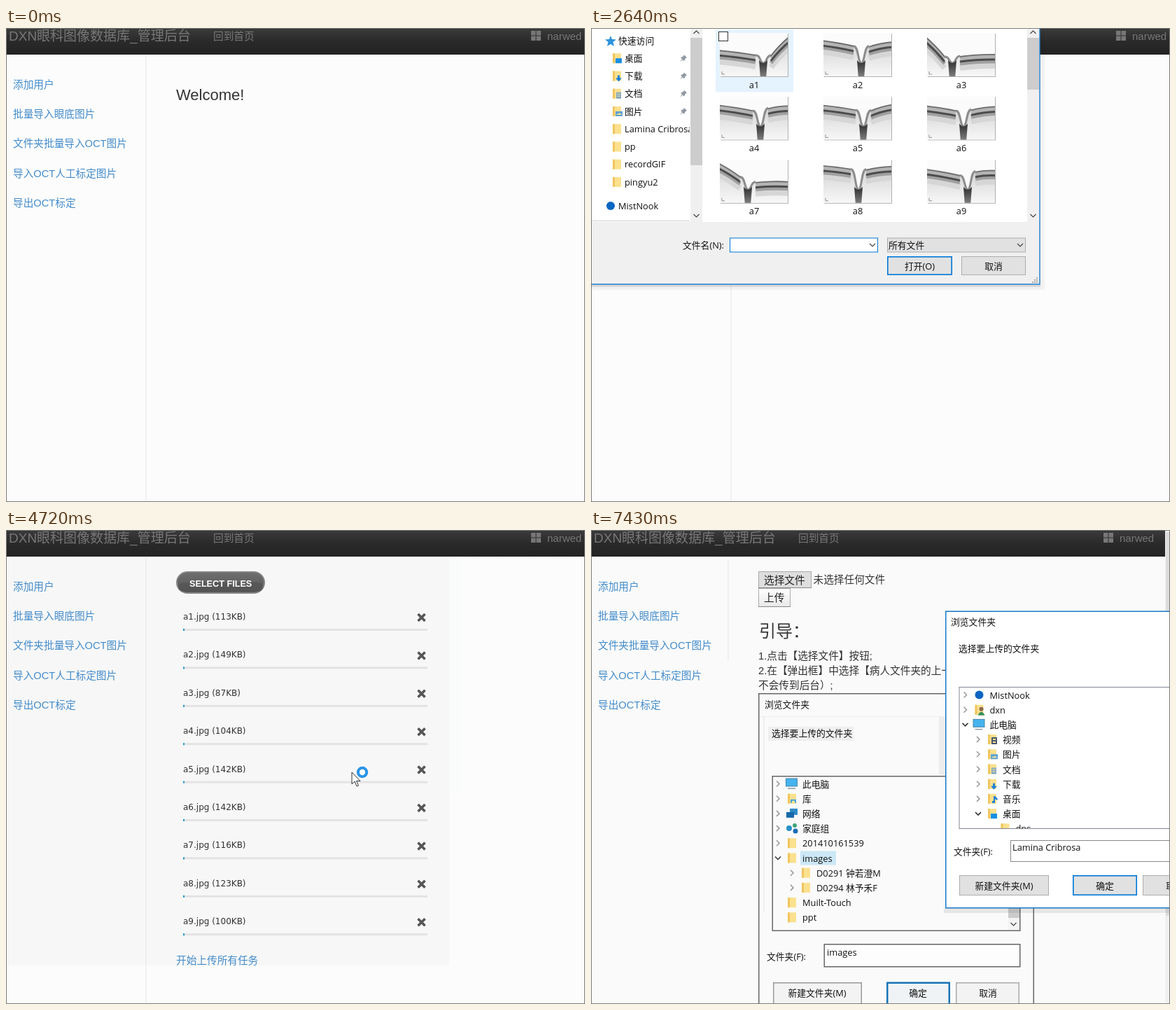
Write an HTML page that moves like this. It is 827 by 677 pixels and loops after 8000 ms.

```html
<!DOCTYPE html>
<html lang="zh-CN">
<head>
<meta charset="utf-8">
<style>
html, body { margin: 0; width: 100%; height: 100%; overflow: hidden; background: #fcfcfc; }
svg { display: block; }
text { font-family: "Liberation Sans", "Noto Sans CJK SC", "Noto Sans CJK", sans-serif; font-weight: 300; white-space: pre; text-spacing-trim: space-all; }
.ui { font-family: "Open Sans", "Noto Sans CJK SC", "Noto Sans CJK", sans-serif; font-weight: 400; }
.list { font-family: "DejaVu Sans", sans-serif; font-weight: 400; }
.bold { font-weight: 700; }
.soft { filter: blur(.7px); }
</style>
</head>
<body>
<svg id="stage" width="827" height="677" viewBox="0 0 827 677"></svg>
<script>
const LOOP = 8000;
const layers = [];
const at = (from, to, content) => layers.push({ from, to, content });

// Drawing helpers
const rect = (x, y, w, h, fill, more = "") => `<rect x="${x}" y="${y}" width="${w}" height="${h}" fill="${fill}" ${more}/>`;
const box = (x, y, w, h, fill, stroke, sw = 1) =>
  rect(x + sw / 2, y + sw / 2, w - sw, h - sw, fill, `stroke="${stroke}" stroke-width="${sw}"`);
const fillPath = (d, fill, more = "") => `<path d="${d}" fill="${fill}" ${more}/>`;
const line = (d, stroke, sw = 1, more = "") => `<path d="${d}" fill="none" stroke="${stroke}" stroke-width="${sw}" ${more}/>`;
const circle = (x, y, r, fill, more = "") => `<circle cx="${x}" cy="${y}" r="${r}" fill="${fill}" ${more}/>`;
const text = (x, y, s, fill = "#333", size = 14.67, more = "") =>
  `<text x="${x}" y="${y}" fill="${fill}" font-size="${size}" ${more}>${s}</text>`;
const ui = (x, y, s, more = "", size = 12.8) => text(x, y, s, "#111", size, `class="ui" ${more}`);
const mid = (x, y, s) => ui(x, y, s, 'text-anchor="middle"');
const group = (content, more) => `<g ${more}>${content}</g>`;
const clip = (x, y, w, h, content) => `<svg x="${x}" y="${y}" width="${w}" height="${h}" viewBox="${x} ${y} ${w} ${h}">${content}</svg>`;
const turns = { r: "m-2-4 4 4-4 4", d: "m-4-2 4 4 4-4", u: "m-4 2 4-4 4 4" };
const chevron = (x, y, dir, color = "#444", sw = 1.2) => line(`M${x} ${y}${turns[dir]}`, color, sw);
const button = (x, y, w, h, label, main, face = "#e1e1e1") =>
  box(x, y, w, h, face, main ? "#0078d7" : "#adadad", main ? 1.6 : 1) + mid(x + w / 2, y + h / 2 + 5, label);

const badges = {
  desk: ["#168fe5", "m-2 0h9v7h-9z"],
  down: ["#1b82d6", "m1-1h3v4h3l-4.5 5-4.5-5h3z"],
  doc: ["#7fa9c4", "m-1-2h7v9h-7zm1 2v1h5v-1zm0 3v1h5v-1z"],
  pic: ["#5ba2d4", "m-2 0h10v7h-10zm1 5h8l-3-3-2 2-1-1z"],
  music: ["#1b82d6", "m2-4h2l4 4-1 2-3-2v6h-4v-3h2z"],
  video: ["#4b5a74", "m-1-3h8v10h-8zm2 2v2h4v-2zm0 4v2h4v-2z"],
  lib: ["#46a5da", "m-2 6v-5h8v5h-2v-3h-4v3z"]
};

function icon(kind, x, y) {
  if (kind == "cloud") return circle(x, y, 6, "#0a66c2");
  if (kind == "star") return fillPath(`M${x} ${y - 7}l2 5 6 .5-4.5 3.5 1.5 6-5-3-5 3 1.5-6-4.5-3.5 6-.5z`, "#2f93dd");
  if (kind == "pc") return box(x - 9, y - 8, 17, 12, "#45b3ee", "#4b87a8") + rect(x - 6, y + 6, 11, 1.5, "#8a9aa5");
  if (kind == "net") return rect(x - 3, y - 7, 11, 9, "#2f8bc7") + rect(x - 8, y - 2, 11, 8, "#1769a8");
  if (kind == "home") return circle(x - 4, y, 4, "#2a8fc9") + circle(x + 4, y - 4, 3, "#3fa47b") + circle(x + 5, y + 4, 3.5, "#1b6db5");
  const folder = rect(x - 6, y - 7, 12, 14, "#fbe08e") + rect(x - 6, y - 7, 3, 14, "#f0c65f");
  if (kind == "user") return folder + circle(x + 3, y - 1, 3, "#8a6a50") + fillPath(`M${x - 2} ${y + 8}q5-10 10 0z`, "#3b8f57");
  const b = badges[kind];
  return folder + (b ? fillPath(`M${x} ${y}${b[1]}`, b[0], 'fill-rule="evenodd"') : "");
}

// Web page
const header = (w, userX) =>
  rect(0, 0, w, 38, "url(#bar)") +
  text(4, 18, "DXN眼科图像数据库_管理后台", "#777", 19) +
  text(296, 16.5, "回到首页", "#777") +
  [0, 1, 2, 3].map(i => rect(userX - 23 + i % 2 * 7.5, 4 + (i >> 1) * 7.5, 6.5, 6.5, "#777")).join("") +
  text(userX, 16.5, "narwed", "#777", 15);

const links = ["添加用户", "批量导入眼底图片", "文件夹批量导入OCT图片", "导入OCT人工标定图片", "导出OCT标定"];
const link = (i, hover) =>
  text(10, 86 + i * 42.2, links[i], hover ? "#2a6496" : "#428bca", 14.67, hover ? 'text-decoration="underline"' : "");
const menu = links.map((_, i) => link(i)).join("");
const divider = rect(199.5, 40, 1, 636, "#e6e6e6");
const frame = box(0, 0, 827, 677, "none", "#7c7c7c");

const selectButton =
  rect(244, 60, 125, 30, "url(#pill)", 'rx="15" stroke="#858585" stroke-width="2"') +
  rect(246, 75, 121, 13, "#505050", 'rx="6.5" opacity=".6"') +
  text(262, 81, "SELECT FILES", "#fff", 12.67, 'class="bold"');
const startLink = y => text(243, y, "开始上传所有任务", "#428bca");

function fileRow(size, i) {
  const y = 54.4 * i;
  return text(253, 128 + y, `a${i + 1}.jpg (${size}KB)`, "#333", 12, 'class="list"') +
    line(`M588.5 ${120 + y}l10 10m0-10l-10 10`, "#565656", 3.6) +
    rect(253, 141 + y, 349, 3, "#e3e3e3") + rect(253, 141 + y, 2, 3, "#1a9ad6");
}

const pointer = (x, y) =>
  fillPath(`M${x} ${y}v17l4-4 3 7 2.5-1-3-6.5h5.5z`, "#fff", 'stroke="#333" stroke-width="1"') +
  circle(x + 15, y, 6.2, "#fff", 'stroke="#2b94e6" stroke-width="4"');
const ripple = (x, y) => circle(x, y, 24, "#ccc", 'fill-opacity=".1" stroke="#bbb" stroke-opacity=".2" stroke-width="4"');

// Scan: left edge, left rim, pit position, right rim, right edge
const scans = [
  [24, 31, 62, 32, 4], [10, 18, 54, 19, 12], [4, 33, 36, 33, 30],
  [12, 20, 58, 17, 13], [12, 19, 57, 20, 11], [13, 20, 52, 19, 14],
  [4, 24, 40, 32, 31], [8, 13, 50, 14, 9], [13, 22, 58, 17, 15]
];
function scan(x, y, [l, m, p, n, r]) {
  const leftEnd = p - 11, rightEnd = p + 11;
  const left = dy => `M-3 ${l + dy}Q${leftEnd / 2} ${(l + m) / 2 + dy - 1} ${leftEnd} ${m + dy}`;
  const rightCurve = dy => `Q${(rightEnd + 97) / 2} ${(n + r) / 2 + dy - 2} 100 ${r + dy}`;
  const arms = (dy, color, w) => line(left(dy) + `M${rightEnd} ${n + dy}` + rightCurve(dy), color, w);
  const pit = `C${p - 4} ${m} ${p - 5} 42 ${p} 43S${p + 4} ${n} ${rightEnd} ${n}`;
  const layersOfTissue =
    fillPath(left(0) + pit + rightCurve(0) + "V66H-3z", "url(#tissue)") +
    arms(17, "#d6d6d6", 8) + arms(11, "#a0a0a0", 5) + arms(4, "#b4b4b4", 6) +
    arms(8, "#4c4c4c", 3) + arms(1, "#6e6e6e", 1.8) +
    line(`M${leftEnd} ${m + 1}${pit}`, "#8c8c8c", 3) +
    fillPath(`M${p - 6} 39q6 8 12 0l-2 27h-8z`, "url(#stem)");
  return rect(x + 1, y + 1, 97, 62, "#b0b0b0") +
    `<svg x="${x}" y="${y}" width="97" height="62">` + rect(0, 0, 97, 62, "#fbfbfb") +
    group(layersOfTissue, 'class="soft"') + line("M3 55v4h4", "#666", .7) + "</svg>";
}

function thumb(i, state) {
  const x = 178 + i % 3 * 148, y = 2 + (i / 3 | 0) * 90.4;
  const back = { hover: "#e5f3ff", on: "#cce8ff" }[state];
  return (back ? rect(x, y, 111, 89.5, back) : "") +
    scan(x + 6, y + 5, scans[i]) + mid(x + 55, y + 83.5, "a" + (i + 1)) +
    (state ? box(x + 4, y + 3, 14, 14, "#fff", "#333") : "") +
    (state == "on" ? line(`M${x + 7} ${y + 10}l3 3 6-6`, "#222", 1.3) : "");
}

const places = [
  ["star", "快速访问"], ["desk", "桌面"], ["down", "下载"], ["doc", "文档"], ["pic", "图片"],
  ["folder", "Lamina Cribrosa"], ["folder", "pp"], ["folder", "recordGIF"], ["folder", "pingyu2"], ["cloud", "MistNook"]
];
const pin = y => fillPath(`M132 ${y}m1-5 4 4-2 1-2 4-2-2-4 3 3-4-2-2 4-2z`, "#9099a3");
function place([kind, name], i) {
  const root = i == 0 || i == 9, y = i == 9 ? 254 : 18 + 25.25 * i;
  return icon(kind, root ? 28 : 37, y) + ui(root ? 39 : 48, y + 4.5, name) + (i > 0 && i < 5 ? pin(y) : "");
}

const scrollbar = (x, w, end, low, track) =>
  rect(x, 0, w, end, track) + rect(x, 14, w, low - 14, "#cdcdcd") +
  chevron(x + w / 2, 6, "u") + chevron(x + w / 2, 268, "d");

const solid = { paper: "#fff", panel: "#f0f0f0", face: "#e1e1e1" };
const pale = { paper: "#f6f6f6", panel: "#f6f6f6", face: "#f6f6f6" };

function openDialog(stateOf, name, focus, { paper, panel, face } = solid) {
  const grip = [0, 1, 2].map(i => [0, 1, 2].filter(j => i + j > 1).map(j => rect(630 + 3 * i, 356 + 3 * j, 2, 2, "#aaa")).join("")).join("");
  return rect(0, 0, 641, 366, panel) + rect(0, 0, 641, 277, paper) +
    clip(0, 0, 141, 275, places.map(place).join("")) +
    rect(0, 275, 141, 1, "#d0d0d0") + scrollbar(142, 17, 277, 196, panel) + scrollbar(623, 17, 277, 88, panel) +
    scans.map((_, i) => thumb(i, stateOf(i))).join("") +
    ui(131, 315, "文件名(N):") +
    box(198, 299.5, 212, 21, paper, focus ? "#0078d7" : "#7a7a7a") +
    clip(199, 300, 193, 20, ui(200.5, 315, name, "", 13.1)) + chevron(402, 310, "d") +
    box(423, 299.5, 198, 21, face, "#adadad") + ui(425, 315, "所有文件") + chevron(613, 310, "d") +
    button(423, 326, 93, 27, "打开(O)", true, face) + button(529, 326, 92, 27, "取消", false, face) +
    grip + line("M0 366H641V0", "#1979ca", 1.4);
}
const none = () => "";
const shadow = rect(642, 0, 6, 374, "#000", 'opacity=".04"') +
  rect(0, 367, 642, 7, "#000", 'opacity=".04"') + rect(0, 367, 642, 3, "#000", 'opacity=".1"');
const caret = rect(200.5, 302, 1, 16, "#000");

// Folder trees: [level, state, icon, label]
function tree(x, y, step, items) {
  return items.map(([level, state, kind, name], i) => {
    const ix = x + level * step, cy = y + i * 21.2;
    return (name == "images" ? rect(ix + 32, cy - 10, 51, 20, "#cce8f6") : "") +
      (state ? chevron(ix, cy, state, state == "r" ? "#999" : "#333", 1.5) : "") +
      icon(kind, ix + 20, cy) + ui(ix + 35, cy + 5, name);
  }).join("");
}
const pictureTree = [
  [0, "r", "pc", "此电脑"], [0, "r", "lib", "库"], [0, "r", "net", "网络"], [0, "r", "home", "家庭组"],
  [0, "r", "folder", "201410161539"], [0, "d", "folder", "images"], [1, "r", "folder", "D0291 钟若澄M"],
  [1, "r", "folder", "D0294 林予禾F"], [0, "", "folder", "Muilt-Touch"], [0, "", "folder", "ppt"]
];
const liveTree = [
  [0, "r", "cloud", "MistNook"], [0, "r", "user", "dxn"], [0, "d", "pc", "此电脑"],
  [1, "r", "video", "视频"], [1, "r", "pic", "图片"], [1, "r", "doc", "文档"], [1, "r", "down", "下载"],
  [1, "r", "music", "音乐"], [1, "d", "desk", "桌面"], [2, "", "folder", "dps"]
];

const plainButton = (y, w, h, label, pressed) =>
  rect(239.5, y + .5, w - 1, h - 1, pressed ? "#dedede" : "url(#soft)", 'stroke="#aaa"') +
  rect(239, y + h - 1, w, 1, "#888") + text(247, y + h / 2 + 5.5, label, "#222");

const guide =
  plainButton(59, 76, 24, "选择文件") + text(317.5, 76, "未选择任何文件") + plainButton(83, 46, 27, "上传") +
  text(240, 153, "引导：", "#333", 24) +
  text(239, 185, "1.点击【选择文件】按钮;") +
  text(239, 206, "2.在【弹出框】中选择【病人文件夹的上一级文件夹】，名字随意（最外层文件夹") +
  text(239, 227, "不会传到后台）;");

const picture =
  box(239, 233, 394, 460, "none", "#666", 1.5) +
  ui(248, 254, "浏览文件夹") + line("M610.5 243.5l10 10m0-10l-10 10", "#333", 1.3) +
  ui(258, 295, "选择要上传的文件夹") +
  box(258.5, 351, 355, 222, "none", "#666", 1.5) +
  rect(596, 353, 16, 218, "#f3f3f3") + rect(596, 412, 16, 142, "#cbcbcb") +
  chevron(603.5, 362, "u") + chevron(603.5, 563, "d") +
  tree(267, 362.5, 20, pictureTree) +
  ui(251, 614, "文件夹(F):") + box(332.5, 591, 281, 33.5, "#fdfdfd", "#666", 1.5) + ui(337, 608, "images") +
  box(260, 646, 127, 34, "#f3f3f3", "#999", 1.5) + mid(323, 666, "新建文件夹(M)") +
  box(422, 645.5, 91, 34, "#f0f3f5", "#1874b8", 2.5) + mid(467, 666, "确定") +
  box(521, 646, 91, 34, "#f3f3f3", "#aaa", 1.5) + mid(567, 666, "取消");

const folderDialog =
  rect(504, 540, 323, 7, "#000", 'opacity=".08"') +
  box(506, 115.5, 340, 425, "#fff", "#1979ca", 1.5) +
  ui(514, 136, "浏览文件夹") + ui(525, 174, "选择要上传的文件夹") +
  box(525.5, 224, 330, 203, "#fff", "#828790") +
  clip(526, 225, 301, 201, tree(534.5, 235.5, 18.5, liveTree)) +
  ui(518, 464, "文件夹(F):") + box(599, 443, 250, 31, "#fff", "#888") + ui(602, 458, "Lamina Cribrosa") +
  button(526, 493, 128, 29, "新建文件夹(M)") + button(688, 493, 92, 29, "确定", true) + button(788, 493, 92, 29, "取消");

// Timeline: upload page
at(4180, 6270, rect(633, 38, 18, 338, "#fafcfb"));
at(4180, 4350, rect(2, 38, 640, 334, "#f8f8f8"));
at(4350, 6270, rect(2, 38, 631, 584, "#f7f7f7"));
at(1600, 1840, rect(1, 59, 91, 85, "#f9f9f9") + rect(92, 59, 107, 85, "#f3f3f3") + rect(202, 59, 222, 85, "#fefefe"));
at(0, 6270, header(827, 773) + divider + menu);
at(650, 930, link(1, true));
at(0, 810, text(243, 103, "Welcome!", "#333", 22));
at(810, 6270, selectButton);
at(810, 4350, startLink(121));
at(4350, 6270, [113, 149, 87, 104, 142, 142, 116, 123, 100].map(fileRow).join("") + startLink(620));
at(1600, 1840, ripple(329, 61));

// File dialog grows in over the fading page header, then takes the selection
const opening = openDialog(none, "", true, pale);
const empty = openDialog(none, "", true);
at(1720, 1840, group(opening, 'opacity=".35" transform="matrix(.97 0 0 .97 9 3)"'));
at(1840, 1990, rect(0, 0, 640, 365, pale.panel) +
  group(opening + caret, 'transform="matrix(.9935 0 0 .993 2.2 .6)"') +
  rect(0, 23, 638, 15, "#000", 'opacity=".13"') +
  rect(639, 0, 8, 373, "#000", 'opacity=".02"') + rect(0, 366, 200, 3, "#000", 'opacity=".1"'));
at(1990, 4180, shadow);
at(1990, 2640, empty);
at(1990, 2390, caret);
at(2640, 2760, openDialog(i => i ? "" : "hover", "", true));
at(2760, 3670, openDialog(i => i ? "" : "on", "a1"));
at(3670, 4180, openDialog(() => "on", '"a9" "a1" "a2" "a3" "a4" "a5" "a6" "a7" "a8"') +
  box(473.5, 182.5, 111, 90, "none", "#99d1ff"));
at(3670, 3790, clip(474, 183, 110, 89, ripple(546, 248)));

at(4720, 6000, pointer(494, 346));
at(6130, 6270, link(2, true));

// Folder page
at(6270, LOOP, rect(0, 0, 827, 677, "#fafafa") + header(820, 755) + menu +
  rect(820, 0, 7, 677, "#f0f0f0") + rect(821, 3, 6, 548, "#dcdcdc") + guide);
at(7020, LOOP, plainButton(59, 76, 24, "选择文件", true) + rect(195.5, 42, 1, 144, "#e6e6e6"));
at(7310, LOOP, rect(246.5, 266, 1, 280, "#e4e4e4") + rect(240, 266, 266, 1, "#eee") +
  rect(497, 266, 9, 84, "#ededed") + rect(253, 281, 122, 20, "#efefef"));
at(6270, LOOP, picture);
at(6000, 7020, pointer(140, 166));
at(7160, 7310, group(folderDialog, 'opacity=".45"'));
at(7310, 7430, group(folderDialog, 'opacity=".85"'));
at(7430, LOOP, folderDialog);

const gradient = (id, ...colors) => `<linearGradient id="${id}" x2="0" y2="1">` +
  colors.map((c, i) => `<stop offset="${i / (colors.length - 1)}" stop-color="${c}"/>`).join("") + "</linearGradient>";

const stage = document.getElementById("stage");
stage.innerHTML = "<defs>" + gradient("bar", "#3b3b3b", "#2a2a2a", "#232323") + gradient("pill", "#6e6e6e", "#585858") +
  gradient("soft", "#fff", "#e9e9e9") + gradient("tissue", "#cfcfcf", "#e6e6e6", "#fafafa") + gradient("stem", "#2c2c2c", "#8a8a8a") +
  "</defs>" + rect(0, 0, 827, 677, "#fcfcfc") + layers.map(l => group(l.content, 'class="layer"')).join("") + frame;
const nodes = stage.querySelectorAll(".layer");

function draw() {
  const t = performance.now() % LOOP;
  layers.forEach((l, i) => nodes[i].style.display = t >= l.from && t < l.to ? "" : "none");
  requestAnimationFrame(draw);
}
draw();
</script>
</body>
</html>
```
